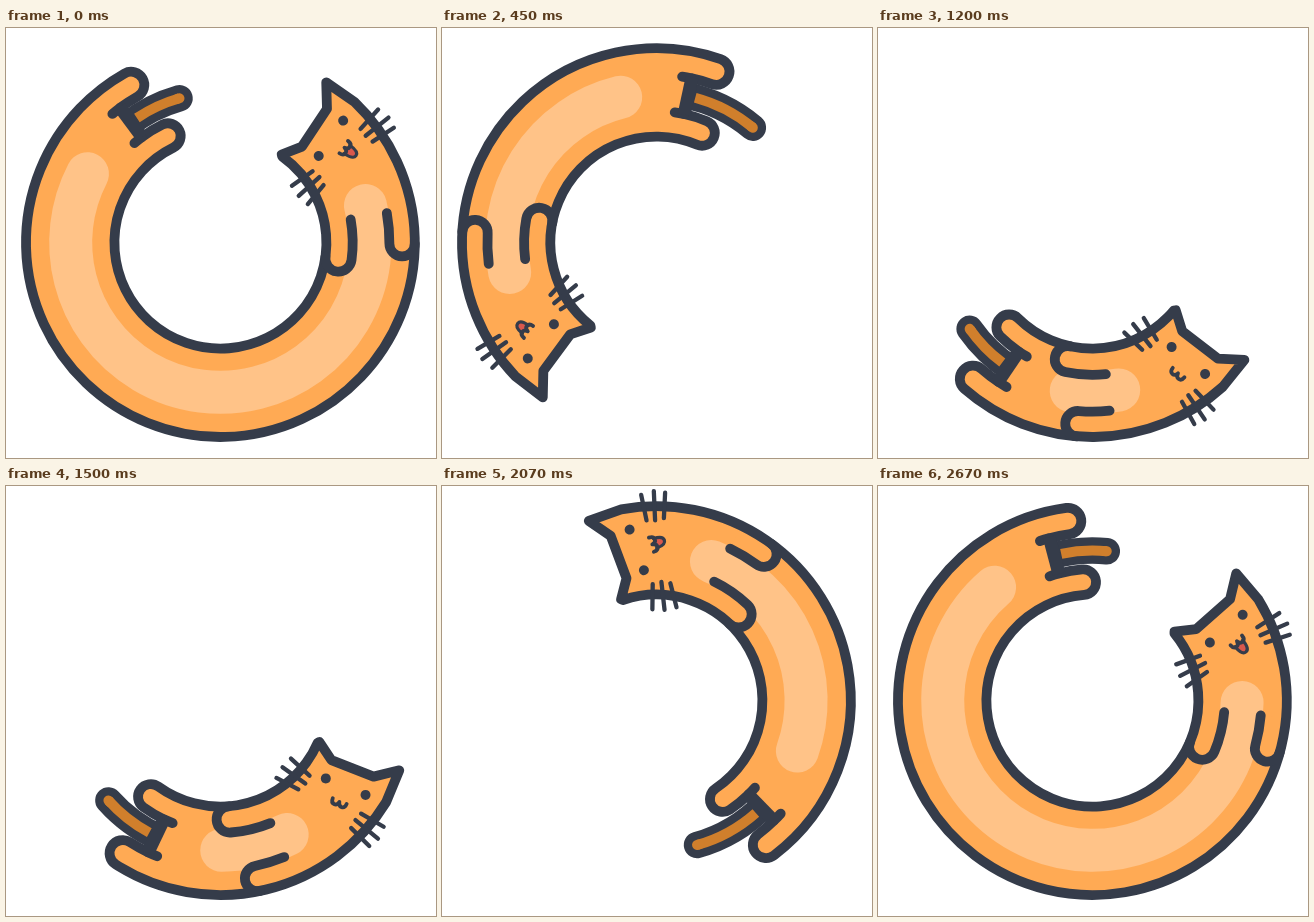
Recreate the animation shown at these times as an HTML page with a canvas. Size 430 px wide and 430 px high, loop 2.7 s.

```html
<!DOCTYPE html>
<html lang="en">
<head>
<meta charset="utf-8">
<title>Endless cat</title>
<style>
  html, body { margin: 0; width: 100%; height: 100%; overflow: hidden; background: #fff; }
  canvas { display: block; }
</style>
</head>
<body>
<canvas id="stage" width="430" height="430"></canvas>
<script>
const ctx = document.getElementById('stage').getContext('2d');
const LOOP = 2700, STEP = 30, START = 1168, SNAP = 2670;
const CX = 214.4, CY = 214.6, INNER = 106, OUTER = 194.4, LINE = 9.8;
const DARK = '#353c4a', FUR = '#ffaa54', BELLY = '#ffc388', TAIL = '#d07f2c', RED = '#d9584c';
const rad = d => d * Math.PI / 180;
const clamp = v => Math.max(0, Math.min(1, v));

function bezier(x1, y1, x2, y2) {
  const at = (a, b, s) => 3 * (1 - s) * (1 - s) * s * a + 3 * (1 - s) * s * s * b + s * s * s;
  return x => {
    let lo = 0, hi = 1;
    for (let i = 0; i < 30; i++) {
      const mid = (lo + hi) / 2;
      if (at(x1, x2, mid) < x) lo = mid; else hi = mid;
    }
    return at(y1, y2, lo);
  };
}
const headEase = bezier(.496, 0, .504, 1);
const stretchEase = bezier(.54, 0, .75, .61);
const snapEase = bezier(.34, .6, .455, .95);

// Tail length in degrees over time
const tailSteps = [[0, 22], [450, 29], [900, 23.3], [1200, 22], [1500, 24],
  [1830, 28], [2200, 30.5], [2670, 21.5], [2700, 22]];
function tailLength(t) {
  const i = tailSteps.findIndex(s => s[0] > t);
  const [t0, a] = tailSteps[i - 1], [t1, b] = tailSteps[i];
  return a + (b - a) * (1 - Math.cos(Math.PI * (t - t0) / (t1 - t0))) / 2;
}

function pose(t) {
  const c = t < START ? t + LOOP : t;
  const head = -309 - 720 * headEase((c - START) / LOOP);
  const rear = c < SNAP
    ? -237 - 229 * stretchEase((c - START) / (SNAP - START))
    : -466 - 491 * snapEase((c - SNAP) / (START + LOOP - SNAP));
  return { head, rear, tail: tailLength(t) };
}

// Polar drawing helpers, degrees around the ring centre
const lineTo = (r, a) => ctx.lineTo(r * Math.cos(rad(a)), r * Math.sin(rad(a)));
const arc = (r, a, b) => ctx.arc(0, 0, r, rad(a), rad(b), b < a);
function cap(outer, inner, a) {
  const r = (outer + inner) / 2;
  ctx.arc(r * Math.cos(rad(a)), r * Math.sin(rad(a)), (outer - inner) / 2, rad(a), rad(a) + Math.PI);
}
function fill(color) { ctx.fillStyle = color; ctx.fill(); }
function stroke(color, width) { ctx.strokeStyle = color; ctx.lineWidth = width; ctx.stroke(); }
function band(r, a, b, color, width, ends = 'round') {
  ctx.lineCap = ends;
  ctx.beginPath();
  arc(r, a, b);
  stroke(color, width);
  ctx.lineCap = 'round';
}

function drawTail(a, len) {
  band(150, a, a + len, DARK, 26.5);
  band(150, a + 4, a + len, TAIL, 10, 'butt');
  band(150, a + len - 1, a + len, TAIL, 10);
}

function outline(h, a) {
  ctx.beginPath();
  lineTo(107.3, h - 11.8);
  lineTo(126, h - 6.3);
  lineTo(171, h - 8.1);
  lineTo(192, h - 13.2);
  arc(OUTER, h - 3, a + 8.3);
  cap(OUTER, 168, a + 8.3);
  arc(168, a + 8.3, a + 1.2);
  arc(131.5, a + 1.2, a + 11.6);
  cap(131.5, INNER, a + 11.6);
  arc(INNER, a + 11.6, h - 11);
  ctx.closePath();
}

function drawRump(a) {
  band(168, a - 2.2, a + 1, DARK, LINE);
  band(131.5, a - 3, a + 1, DARK, LINE);
  ctx.lineCap = 'butt';
  ctx.beginPath();
  lineTo(131, a + 1.2);
  lineTo(169, a + 1.2);
  stroke(DARK, 13);
  ctx.lineCap = 'round';
}

function fillArm(outer, inner, a, b) {
  ctx.beginPath();
  arc(outer, a, b);
  cap(outer, inner, b);
  arc(inner, b, a);
  fill(FUR);
}

function drawBody(h, a) {
  const top = h + 33.3, left = h + 51, right = h + 43.7;
  outline(h, a);
  fill(FUR);
  band(149.7, h + 29, a - 24.8, BELLY, 43);
  fillArm(132.3, INNER, top, left);
  fillArm(OUTER, 169, top, right);
  outline(h, a);
  stroke(DARK, LINE);
  drawRump(a);
  ctx.beginPath();
  arc(132.3, top, left);
  cap(132.3, INNER, left);
  stroke(DARK, LINE);
  ctx.beginPath();
  cap(OUTER, 169, right);
  arc(169, right, top);
  stroke(DARK, LINE);
}

const whiskers = [
  [180, 13.5, 206, 11.5], [179, 22, 208, 24.5], [180, 31, 205, 35.5],
  [91, 7.8, 116, 11.4], [89, 19.8, 117, 20.3], [90, 32, 114.5, 29]
];

function drawFace(h, open) {
  ctx.save();
  ctx.rotate(rad(h));
  ctx.beginPath();
  for (const [x1, y1, x2, y2] of whiskers) {
    ctx.moveTo(x1, y1);
    ctx.lineTo(x2, y2);
  }
  stroke(DARK, 4.3);
  ctx.translate(152, 0);
  ctx.rotate(rad(-12));
  for (const x of [-21.5, 21.5]) {
    ctx.beginPath();
    ctx.arc(x, 0, 5, 0, 2 * Math.PI);
    fill(DARK);
  }
  ctx.translate(0, 1.5);
  if (open > 0) {
    const y = 18 + 10 * open;
    ctx.beginPath();
    ctx.moveTo(-5, 18);
    ctx.bezierCurveTo(-5, y, -2, y + 1, 0, y + 1);
    ctx.bezierCurveTo(2, y + 1, 5, y, 5, 18);
    fill(RED);
    stroke(DARK, 3.2);
  }
  ctx.beginPath();
  ctx.moveTo(-7.5, 14);
  ctx.bezierCurveTo(-7.5, 20.5, -1, 20.5, 0, 15);
  ctx.bezierCurveTo(1, 20.5, 7.5, 20.5, 7.5, 14);
  stroke(DARK, 3.8);
  ctx.restore();
}

function draw(t) {
  const { head, rear, tail } = pose(t);
  ctx.setTransform(1, 0, 0, 1, 0, 0);
  ctx.fillStyle = '#fff';
  ctx.fillRect(0, 0, 430, 430);
  ctx.translate(CX, CY);
  ctx.lineCap = ctx.lineJoin = 'round';
  drawTail(rear, tail);
  drawBody(head, rear);
  drawFace(head, clamp((rear - head - 98) / 50));
}

function frame() {
  draw(Math.floor(performance.now() % LOOP / STEP) * STEP);
  requestAnimationFrame(frame);
}
frame();
</script>
</body>
</html>
```
